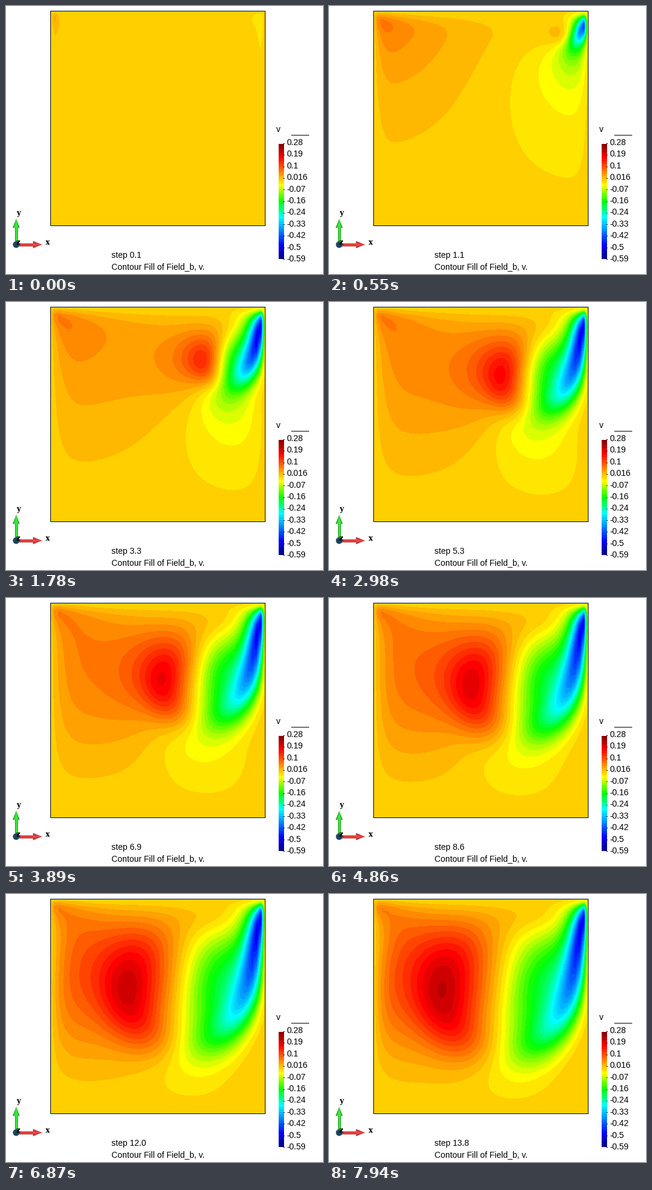
These frames come from a looping animation (529 px wide and 447 px high, 7.99 s). A matplotlib script:

```python
import numpy as np
import matplotlib.pyplot as plt
from matplotlib.animation import FuncAnimation
from matplotlib.patches import Circle, Polygon, Rectangle

W, H, DPI = 529, 447, 100
PX = 72 / DPI
FRAMES, INTERVAL = 170, 47

# flow in a square cavity whose lid slides to the right
N, MESH, RE = 100, 50, 1000
LEAK = 0.45 / MESH  # flux that slips past the two upper corners
DT, SAVE = 0.005, 20
STEPS = 138
VMIN, VMAX, BANDS = -0.5895, 0.2755, 46


def simulate():
    """Vertical velocity on the mesh nodes, every 0.1 time units."""
    h = 1 / N
    k = np.arange(1, N)
    sine = np.sin(np.pi * np.outer(k, k) / N) * np.sqrt(2 / N)
    lam = (2 - 2 * np.cos(np.pi * k / N)) / h**2
    inv = 1 / (lam[:, None] + lam[None, :])
    w = np.zeros((N + 1, N + 1))
    psi = np.zeros((N + 1, N + 1))
    psi[-1] = LEAK
    psi[-2, [0, -1]] = LEAK / 4
    edge = np.zeros((N - 1, N - 1))
    edge[-1] = LEAK / h**2
    edge[-1, [0, -1]] += LEAK / 4 / h**2

    def rate(w):
        psi[1:-1, 1:-1] = sine @ (inv * (sine @ (w[1:-1, 1:-1] + edge) @ sine)) @ sine
        w[0] = -2 * psi[1] / h**2
        w[-1] = -2 * (psi[-2] - LEAK) / h**2 - 2 / h
        w[:, 0] = -2 * (psi[:, 1] - psi[:, 0]) / h**2
        w[:, -1] = -2 * (psi[:, -2] - psi[:, -1]) / h**2
        w[-2, [0, -1]] -= MESH
        u = (psi[2:, 1:-1] - psi[:-2, 1:-1]) / (2 * h)
        v = (psi[1:-1, :-2] - psi[1:-1, 2:]) / (2 * h)
        e, ww = w[1:-1, 2:], w[1:-1, :-2]
        n, s = w[2:, 1:-1], w[:-2, 1:-1]
        lap = (e + ww + n + s - 4 * w[1:-1, 1:-1]) / h**2
        return lap / RE - (u * (e - ww) + v * (n - s)) / (2 * h), v

    out = []
    skip = N // MESH
    for i in range(STEPS * SAVE + 1):
        a, v = rate(w)
        if i and i % SAVE == 0:
            full = np.zeros((N + 1, N + 1))
            full[1:-1, 1:-1] = v
            out.append(full[::-skip, ::skip])
        mid = w.copy()
        mid[1:-1, 1:-1] += a * DT / 2
        w[1:-1, 1:-1] += rate(mid)[0] * DT
    return out


def rainbow(n):
    at = [0, 0.12, 0.36, 0.5, 0.64, 0.88, 1]
    red = [0, 0, 0, 0, 1, 1, 0.5]
    green = [0, 0, 1, 1, 1, 0, 0]
    blue = [0.5, 1, 1, 0, 0, 0, 0]
    x = (np.arange(n) + 0.5) / n
    return np.stack([np.interp(x, at, c) for c in (red, green, blue)], axis=1)


COLORS = rainbow(BANDS)
nodes = np.linspace(0, 1, MESH + 1)
pixels = np.arange(1, 358) / 358
BLEND = np.clip(1 - np.abs(pixels[:, None] - nodes[None, :]) * MESH, 0, 1)


def paint(v):
    fine = BLEND @ v @ BLEND.T
    band = np.floor((fine - VMIN) / (VMAX - VMIN) * BANDS).astype(int)
    return COLORS[np.clip(band, 0, BANDS - 1)]


FIELDS = simulate()

fig = plt.figure(figsize=(W / DPI, H / DPI), dpi=DPI, facecolor="white")
ax = fig.add_axes([0, 0, 1, 1])
ax.axis("off")


def text(x, y, s, size=14, font="Liberation Sans", **kw):
    return ax.text(x, y, s, fontsize=size * PX, family=font, va="baseline", **kw)


def shape(points, color):
    ax.add_patch(Polygon(points, fc=color, ec="none"))


def block(x, y, w, h, z=1):
    ax.add_patch(Rectangle((x, y), w, h, fc="black", ec="none", zorder=z))


block(74, 8, 359, 359, -1)
image = ax.imshow(paint(FIELDS[0]), extent=(75, 432, 366, 9),
                  interpolation="nearest", aspect="auto")

# legend
ax.imshow(COLORS[::-1, None], extent=(455, 464, 422, 230),
          interpolation="nearest", aspect="auto")
text(451, 210, "v")
block(476, 215, 30, 1)
LABELS = "0.28 0.19 0.1 0.016 -0.07 -0.16 -0.24 -0.33 -0.42 -0.5 -0.59"
for i, label in enumerate(LABELS.split()):
    text(468.5, 232 + 19.4 * i, label)
    block(463, round(229 + 19.3 * i), 2, 1)

# axis triad
for d, tint in ((2.5, 0.7), (1.5, 0.9), (0.5, 1)):
    g = (0.24 * tint, 0.95 * tint, 0.24 * tint)
    r = (0.98 * tint, 0.28 * tint, 0.28 * tint)
    shape([(17 - d, 398), (17 - d, 369), (17 + d, 369), (17 + d, 398)], g)
    shape([(17 - d * 2.4, 370), (17, 355), (17 + d * 2.4, 370)], g)
    shape([(17, 398 - d), (46, 398 - d), (46, 398 + d), (17, 398 + d)], r)
    shape([(45, 398 - d * 2.4), (60, 398), (45, 398 + d * 2.4)], r)
ax.add_patch(Circle((17, 398), 5.5, fc="#1d4560", ec="none"))
for x, y, s in ((17, 349, "y"), (66, 398, "x"), (17, 398, "z")):
    text(x, y, s, 12, "DejaVu Serif", weight="bold")

caption = text(176, 420, "step 0.1")
text(176, 439, "Contour Fill of Field_b, v.")

ax.set_xlim(0, W)
ax.set_ylim(H, 0)

# playback time in ms against simulation step
CLOCK = [0, 1090, 1780, 2980, 4860, 5780, 7940]
STEP = [0, 20, 32, 52, 85, 101, 137]


def update(i):
    k = int(np.interp((i + 1) * INTERVAL, CLOCK, STEP))
    image.set_data(paint(FIELDS[k]))
    caption.set_text(f"step {(k + 1) / 10:.1f}")
    return image, caption


anim = FuncAnimation(fig, update, frames=FRAMES, interval=INTERVAL,
                     repeat=True, repeat_delay=0, blit=False)
plt.show()
```
